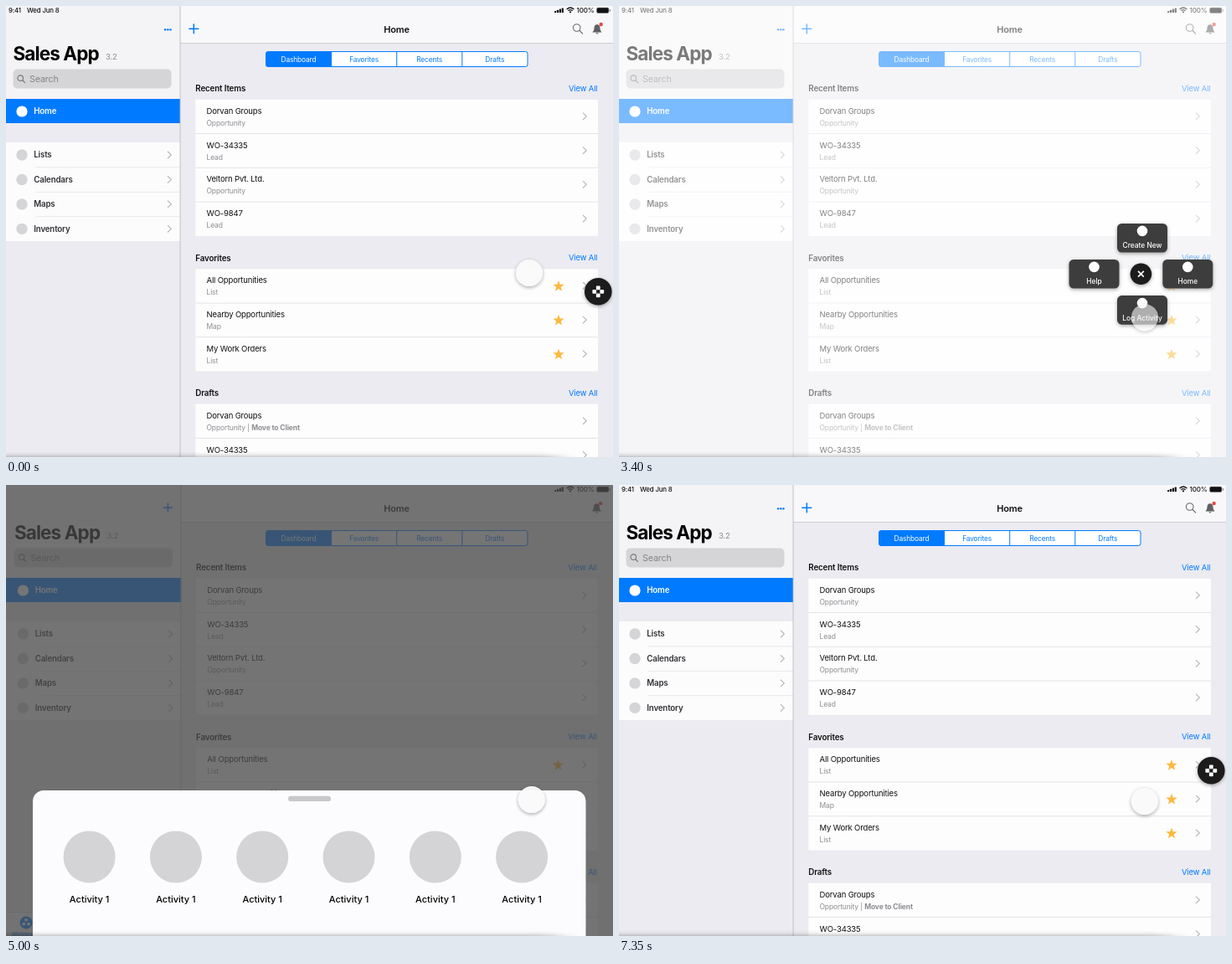
Recreate the animation shown at these times as an HTML page. Size 725 by 539 pixels, loop 7.4 s.

```html
<!DOCTYPE html>
<html lang="en">
<head>
<meta charset="utf-8">
<title>Sales App</title>
<style>
  html, body { margin: 0; width: 100%; height: 100%; overflow: hidden; background: #ebebf1; }
  svg { display: block; width: 725px; height: 539px; }
  text { font-family: Inter, Roboto, "Liberation Sans", sans-serif; letter-spacing: -.016em; white-space: pre; }
</style>
</head>
<body>
<svg id="stage" viewBox="0 0 725 539" xmlns="http://www.w3.org/2000/svg">
  <defs>
    <filter id="shadow" x="-50%" y="-50%" width="200%" height="200%">
      <feDropShadow dx="0" dy="1.5" stdDeviation="2" flood-opacity=".35"/>
    </filter>
    <filter id="blur" x="-10%" y="-200%" width="120%" height="500%">
      <feGaussianBlur stdDeviation="14 3"/>
    </filter>
  </defs>
  <g id="page"></g>
  <rect id="veil" width="725" height="539" fill="#fff"/>
  <g id="menu"></g>
  <g id="button"></g>
  <rect id="dim" width="725" height="539"/>
  <g id="sheet"></g>
  <rect x="-40" y="539" width="700" height="8" filter="url(#blur)" opacity=".4"/>
  <circle id="cursor" r="16" fill="#fafafb" filter="url(#shadow)"/>
</svg>
<script>
const LOOP = 7400;
const BLUE = '#007aff', INK = '#111113', GREY = '#8e8e92', LINE = '#e4e4e8';
const $ = id => document.getElementById(id);

// Markup helpers; text is centred vertically on its capitals.
const text = (s, x, cy, size, fill = INK, weight = 400, anchor = 'start', extra = '') =>
  `<text x="${x}" y="${cy + size * .36}" font-size="${size}" fill="${fill}" font-weight="${weight}" text-anchor="${anchor}" ${extra}>${s}</text>`;
const rect = (x, y, w, h, fill, r = 0, extra = '') =>
  `<rect x="${x}" y="${y}" width="${w}" height="${h}" rx="${r}" fill="${fill}" ${extra}/>`;
const dot = (x, y, r, fill) => `<circle cx="${x}" cy="${y}" r="${r}" fill="${fill}"/>`;
const stroke = (d, color, width = 1) =>
  `<path d="${d}" fill="none" stroke="${color}" stroke-width="${width}"/>`;
const chevron = (x, y) => stroke(`M${x - 2} ${y - 4.2}l4.3 4.2l-4.3 4.2`, '#b9b9be', 1.2);
const plus = (x, y, r, color) => stroke(`M${x - r} ${y}h${2 * r}M${x} ${y - r}v${2 * r}`, color, 1.5);
const lens = (x, y, r, color) =>
  stroke(`M${x + r} ${y}a${r} ${r} 0 1 0 ${-2 * r} 0a${r} ${r} 0 1 0 ${2 * r} 0M${x + r * .7} ${y + r * .7}l${r} ${r}`, color, 1.1);

function star(x, y) {
  const points = Array.from({ length: 10 }, (_, i) => {
    const r = i % 2 ? 2.9 : 7, a = (i / 5 - .5) * Math.PI;
    return `${x + r * Math.cos(a)},${y + .4 + r * Math.sin(a)}`;
  });
  return `<polygon points="${points.join(' ')}" fill="#fdb93e"/>`;
}

function statusBar() {
  let out = '';
  for (let i = 0; i < 4; i++) out += rect(655 + i * 2.9, 6 - i * 1.2, 2.2, 2 + i * 1.2, INK, .4);
  out += stroke('M669.6 4q4.4-4 8.8 0M671.4 5.8q2.6-2.4 5.2 0', INK, 1.3) + dot(674, 7.3, 1.1, INK);
  out += text('100%', 681.5, 5, 8, INK, 500);
  return out + rect(705.5, 2, 14.5, 6.5, INK, 1.7, 'stroke="#88888c" stroke-width=".6"') + rect(721, 4, 1, 2.6, '#88888c');
}

function sidebar(sheetOpen) {
  let out = rect(-3, 0, 211, 111, '#f4f4f7') + rect(-3, 111, 211, 29, BLUE);
  out += text('Sales App', 8.5, 56.5, 22.5, '#000', 700, 'start', 'style="letter-spacing:-.9px"');
  out += text('3.2', 119, 61, 9.5, GREY);
  out += rect(8.5, 75.5, 189, 23, '#d5d4d7', 5) + lens(17.2, 86.2, 3.3, '#77777b') + text('Search', 28, 87, 10.8, '#858589');
  out += dot(19, 126, 6.6, '#fff') + text('Home', 33.3, 126, 9.7, '#fff', 600);
  out += rect(-3, 163, 211, 118, '#fcfcfd');
  ['Lists', 'Calendars', 'Maps', 'Inventory'].forEach((name, i) => {
    const y = 178 + i * 29.45;
    out += dot(19, y, 6.7, '#d5d4d7') + text(name, 33.3, y, 9.7, '#303034', 600) + chevron(195, y);
    if (i) out += rect(35, y - 15, 173, .8, LINE);
  });
  if (sheetOpen) {
    out += plus(192, 27, 5.5, BLUE) + rect(-3, 510, 211, 30, '#f6f6f8') + rect(-3, 510, 211, .7, '#c6c6ca');
    ['Workspaces', 'Recents', 'Chat', 'More'].forEach((name, i) => {
      const x = 22.7 + i * 53, color = i ? GREY : BLUE;
      out += dot(x, 523, 7.5, color) + text(name, x, 537, 6, color, 500, 'middle');
      for (let k = 0; k < 3; k++) {
        const a = k * 2.094 - 1.57;
        out += dot(x + 3.3 * Math.cos(a), 523 + 3.3 * Math.sin(a), 1.9, '#f6f6f8');
      }
    });
  } else {
    for (let i = -1; i < 2; i++) out += dot(193.3 + i * 3.2, 28.3, 1.2, BLUE);
  }
  return out;
}

const sections = [
  { title: 'Recent Items', y: 98.5, rows: [['Dorvan Groups', 'Opportunity'], ['WO-34335', 'Lead'], ['Veltorn Pvt. Ltd.', 'Opportunity'], ['WO-9847', 'Lead']] },
  { title: 'Favorites', y: 301, stars: true, rows: [['All Opportunities', 'List'], ['Nearby Opportunities', 'Map'], ['My Work Orders', 'List']] },
  { title: 'Drafts', y: 462.5, rows: [['Dorvan Groups', 'Opportunity | <tspan font-weight="700">Move to Client</tspan>'], ['WO-34335', 'Lead']] }
];
const ROW = 40.75;

function page(sheetOpen) {
  const left = sheetOpen ? .8 : 0, right = sheetOpen ? -.6 : 0;
  let out = rect(0, 0, 725, 539, '#ebebf1') + rect(208, 0, 517, 44, '#f8f8fa') + rect(208, 44, 517, .8, '#c6c6ca');
  out += `<g transform="translate(${sheetOpen ? 1.4 : 0})">${sidebar(sheetOpen)}</g>`;
  out += rect(207.6 + left, 0, .9, 539, '#bcbcc0') + statusBar();
  out += text('Home', 466.5, 28, 11, INK, 600, 'middle');
  if (!sheetOpen) {
    out += text('9:41', 3, 5, 7.8, INK, 500) + text('Wed Jun 8', 25, 5, 7.8, INK, 500);
    out += plus(224.3, 27.3, 6, BLUE) + lens(681.7, 26, 4.3, '#68686c');
  }
  out += `<g transform="translate(${right})"><path d="M700.5 31.5q2-1.6 2-5q0-4 3.5-4.4q3.5 .4 3.5 4.4q0 3.4 2 5zM704.3 32.2h3.4q-1.7 2.4-3.4 0z" fill="#606064"/>${dot(710.7, 22, 2.2, '#e9473f')}</g>`;

  out += rect(310.5, 54.5, 312.5, 18, '#fff', 2.5) + rect(310.5, 54.5, 78, 18, BLUE, 2);
  ['Dashboard', 'Favorites', 'Recents', 'Drafts'].forEach((name, i) => {
    const x = 310.5 + i * 78.1;
    out += text(name, x + 39, 63.6, 8.4, i ? BLUE : '#fff', 400, 'middle');
    if (i) out += rect(x - .5, 54.5, 1, 18, BLUE);
  });
  out += rect(310.5, 54.5, 312.5, 18, 'none', 2.5, `stroke="${BLUE}"`);

  for (const { title, y, stars, rows } of sections) {
    const top = y + 13.3, width = 480.7 + right - left;
    out += text(title, 226.3 + left, y, 9.8, INK, 600);
    out += text('View All', 706.5 + right, y, 9.5, BLUE, 400, 'end');
    out += rect(226.3 + left, top, width, ROW * rows.length, '#fdfdfe');
    rows.forEach(([name, kind], i) => {
      const rowY = top + i * ROW;
      if (i) out += rect(226.3 + left, rowY - .4, width, .8, '#dedee2');
      out += text(name, 239.5 + left, rowY + 13.7, 9.5);
      out += text(kind, 239.5 + left, rowY + 28, 8.5, GREY);
      if (stars) out += star(660 + right, rowY + 20.3);
      out += chevron(691 + right, rowY + 20);
    });
  }
  return out;
}

const items = [['Create New', 625, 277.2], ['Help', 567.5, 320.2], ['Home', 679.3, 320.2], ['Log Activity', 625, 363.4]];
$('menu').innerHTML = items.map(([name]) =>
  `<g>${rect(-30, -17.3, 60, 34.6, '#3c3c3e', 5.5, 'filter="url(#shadow)"')}${dot(0, -8.3, 6.3, '#fff')}${text(name, 0, 9.2, 8.4, '#fff', 500, 'middle', 'style="letter-spacing:0"')}</g>`
).join('');

const tile = (x, y) => rect(x - 2.4, y - 2.4, 4.8, 4.8, '#fff', 1);
$('button').innerHTML = `<circle id="disc" filter="url(#shadow)"/>
  <g id="grid">${tile(0, -4.5) + tile(0, 4.5) + tile(-4.5, 0) + tile(4.5, 0)}</g>
  <path id="cross" d="M-5 0H5M0-5V5" stroke="#fff" stroke-width="1.8"/>`;

const columns = Array.from({ length: 6 }, (_, i) => 99.6 + i * 103.3);
$('sheet').innerHTML = rect(32, 0, 660.5, 220, '#fcfbfd', 13) + rect(337, 6.7, 51, 6.4, '#c8c7ca', 3.2) +
  columns.map(x => dot(x, 79.5, 31, '#d4d3d5') + text('Activity 1', x, 130.5, 11, '#000', 500, 'middle', 'style="letter-spacing:0"')).join('');
const avatars = $('sheet').querySelectorAll('circle');

const clamp = u => Math.min(1, Math.max(0, u));
const mix = (a, b, u) => a + (b - a) * u;
const easeOut = u => 1 - (1 - clamp(u)) ** 1.72;
const smooth = u => { u = clamp(u); return u * u * (3 - 2 * u); };

// Interpolates [time, ...values] keys with a smooth ease.
function track(keys, t) {
  let value = keys[0].slice(1);
  for (let i = 1; i < keys.length; i++) {
    const start = keys[i - 1][0], u = smooth((t - start) / (keys[i][0] - start));
    value = value.map((v, k) => mix(v, keys[i][k + 1], u));
  }
  return value;
}

const MENU_AT = 735, SHEET_AT = 3843, CLOSE_AT = 6682, FADE = 300;
const path = [[60, 625, 319], [620, 702.5, 341], [1700, 702.5, 341], [2230, 628.5, 372.5], [4000, 627.8, 372], [4400, 627.8, 376], [6400, 627.8, 376], [6600, 627.8, 378]];
const press = [[560, .96], [700, .6], [3980, .6], [4250, .96], [6450, .96], [6620, .6], [6850, .6], [7050, .96]];

let shownPage = null;
function render(t) {
  const opened = easeOut((t - MENU_AT) / FADE);
  const raised = easeOut((t - SHEET_AT) / FADE);
  const closed = easeOut((t - CLOSE_AT) / FADE);
  const menu = opened - raised, sheet = raised - closed, home = 1 - menu - sheet;
  const rising = t < CLOSE_AT;

  const sheetOpen = t >= SHEET_AT && rising;
  if (sheetOpen !== shownPage) {
    shownPage = sheetOpen;
    $('page').innerHTML = page(sheetOpen);
  }
  $('veil').setAttribute('opacity', .48 * (menu + sheet));
  $('dim').setAttribute('opacity', .54 * sheet);

  $('menu').setAttribute('opacity', Math.sqrt(clamp(menu)));
  [...$('menu').children].forEach((item, i) => {
    const [, x, y] = items[i];
    item.setAttribute('transform', `translate(${mix(761, x, menu)} ${mix(341, y, menu)}) scale(${mix(.5, 1, menu)})`);
  });

  const tint = rising ? sheet : 0;
  $('button').setAttribute('transform', `translate(${mix(707.3, 623.4, menu)} ${mix(341.3, 320.2, menu)})`);
  $('button').setAttribute('opacity', rising ? Math.sqrt(clamp(1 - sheet)) : 1 - sheet);
  $('disc').setAttribute('r', mix(16.3, 12.8, menu));
  $('disc').setAttribute('fill', `rgb(${mix(27, 75, tint)},${mix(27, 235, tint)},${mix(29, 255, tint)})`);
  $('grid').setAttribute('opacity', home);
  $('cross').setAttribute('opacity', 1 - home);
  $('cross').setAttribute('transform', `rotate(${45 * menu}) scale(${mix(1.2, .95, menu)})`);

  $('sheet').setAttribute('transform', `translate(0 ${mix(540, 365, sheet)})`);
  $('sheet').setAttribute('opacity', sheet);
  avatars.forEach(a => a.setAttribute('r', rising ? mix(42, 31, sheet) : 31));

  const [x, y] = track(path, t);
  $('cursor').setAttribute('transform', `translate(${x} ${y})`);
  $('cursor').setAttribute('opacity', track(press, t)[0]);
}

const begin = performance.now();
function tick() {
  render((performance.now() - begin) % LOOP);
  requestAnimationFrame(tick);
}
tick();
</script>
</body>
</html>
```
